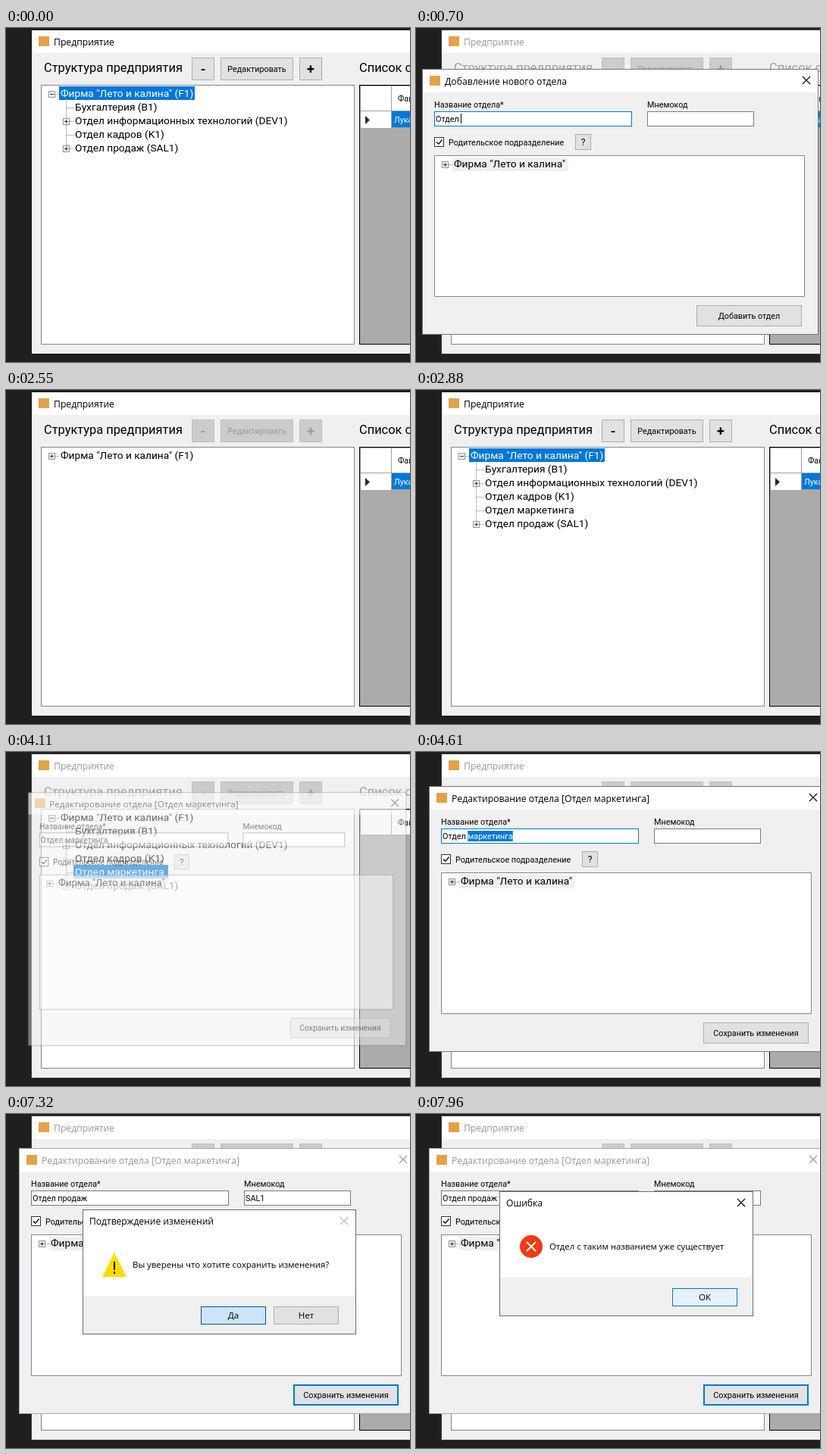
An HTML page with a canvas that plays this animation: 533x441 px, repeating every 8 s.

```html
<!DOCTYPE html>
<html lang="ru">
<head>
<meta charset="utf-8">
<title>Предприятие</title>
<style>
html, body { margin: 0; width: 100%; height: 100%; overflow: hidden; background: #1f1f1f; }
canvas { display: block; }
</style>
</head>
<body>
<canvas id="stage" width="533" height="441"></canvas>
<script>
const ctx = document.getElementById('stage').getContext('2d');
const LOOP = 8000;
const BLUE = '#0078d7', FACE = '#f0f0f0', EDGE = '#828790', PALE = '#a0a0a0';
const UI = '"Open Sans", sans-serif', FORM = 'Roboto, sans-serif';
const SMALL = 10.8, TREE = 13.7, HEADING = 16.4;
const FIRM = 'Фирма "Лето и калина"';
const NORMAL = ['#e1e1e1', '#adadad', 1], DEFAULT = ['#e1e1e1', BLUE, 2],
  HOVER = ['#e5f1fb', BLUE, 1], PRESSED = ['#cce4f7', '#005499', 1],
  DISABLED = ['#cccccc', '#bfbfbf', 1];
let t = 0;

const between = (a, b) => t >= a && t < b;
const ramp = (a, b) => Math.min(1, Math.max(0, (t - a) / (b - a)));
// Latest value whose start time has passed: at(first, time, value, time, value, ...)
function at(value, ...steps) {
  for (let i = 0; i < steps.length && t >= steps[i]; i += 2) value = steps[i + 1];
  return value;
}

function rect(x, y, w, h, color) {
  ctx.fillStyle = color;
  ctx.fillRect(x, y, w, h);
}

function box(x, y, w, h, fill, edge, line = 1) {
  rect(x + line, y + line, w - 2 * line, h - 2 * line, fill);
  ctx.strokeStyle = edge;
  ctx.lineWidth = line;
  ctx.strokeRect(x + line / 2, y + line / 2, w - line, h - line);
}

function text(str, x, y, size, color = '#000', font = FORM, align = 'left', weight = '') {
  ctx.font = `${weight} ${size}px ${font}`;
  ctx.textAlign = align;
  ctx.textBaseline = 'alphabetic';
  ctx.fillStyle = color;
  ctx.fillText(str, x, Math.round(y + size * 0.36));
  return ctx.measureText(str).width;
}

function stroke(color, width, points, dash = []) {
  ctx.strokeStyle = color;
  ctx.lineWidth = width;
  ctx.setLineDash(dash);
  ctx.beginPath();
  for (let i = 0; i < points.length; i += 4) {
    ctx.moveTo(points[i], points[i + 1]);
    ctx.lineTo(points[i + 2], points[i + 3]);
  }
  ctx.stroke();
  ctx.setLineDash([]);
}

const dotted = (...points) => stroke('#808080', 1, points, [1, 1]);
const cross = (x, y, r, color, width) =>
  stroke(color, width, [x - r, y - r, x + r, y + r, x - r, y + r, x + r, y - r]);

function button(label, x, y, w, h, style, size = SMALL, color = '#000', font = FORM, weight = '') {
  box(x, y, w, h, ...style);
  text(label, x + w / 2, y + h / 2, size, color, font, 'center', weight);
}

function expander(x, y, open) {
  box(x - 4, y - 4, 9, 9, '#fff', '#919191');
  rect(x - 2, y, 5, 1, '#333');
  if (!open) rect(x, y - 2, 1, 5, '#333');
}

function titleBar(title, x, y, w, active) {
  rect(x, y, w, 30, '#fff');
  rect(x + 9, y + 8, 14, 13, '#e3a24a');
  text(title, x + 29, y + 15.5, 12.2, active ? '#000' : '#999', UI);
}

function mainTree() {
  box(46, 75, 414, 343, '#fff', EDGE);
  const open = !between(2170, 2880), chosen = at('root', 2170, '', 2880, 'root', 3260, 'new');
  const rows = ['Бухгалтерия (B1)', 'Отдел информационных технологий (DEV1)',
    'Отдел кадров (K1)', 'Отдел продаж (SAL1)'];
  if (t >= 2170) rows.splice(3, 0, 'Отдел маркетинга');

  dotted(65, 87.5, 70, 87.5);
  expander(60, 87, open);
  if (chosen === 'root') rect(70, 77, 179, 18, BLUE);
  text(FIRM + ' (F1)', 72, 86.5, TREE, chosen === 'root' ? '#fff' : '#000');
  if (!open) return;

  dotted(79.5, 96, 79.5, 87 + rows.length * 18);
  rows.forEach((row, i) => {
    const y = 105 + i * 18, selected = chosen === 'new' && i === 3;
    dotted(80, y + .5, 89, y + .5);
    if (/DEV1|SAL1/.test(row)) expander(79, y, false);
    if (selected) rect(89, y - 10, 125, 18, BLUE);
    text(row, 91, y - .5, TREE, selected ? '#fff' : '#000');
  });
}

function grid() {
  box(466, 75, 100, 343, '#ababab', '#000');
  box(467, 76, 42, 34, '#fff', PALE);
  box(508, 76, 90, 34, '#fff', PALE);
  text('Фамилия', 517, 93, SMALL);
  if (t >= 3410) return;
  rect(467, 110, 1, 22, PALE);
  rect(468, 110, 40, 22, '#fff');
  rect(508, 110, 1, 22, PALE);
  rect(509, 110, 24, 21, BLUE);
  rect(509, 131, 24, 1, PALE);
  text('Лукарин', 512, 121, SMALL, '#fff');
  ctx.fillStyle = '#25254f';
  ctx.beginPath();
  ctx.moveTo(474, 116);
  ctx.lineTo(480, 121.5);
  ctx.lineTo(474, 127);
  ctx.fill();
}

function mainWindow() {
  const active = !between(150, 2490) && t < 4110;
  const ready = active && !between(2170, 2880);
  const ink = active ? '#000' : PALE, label = ready ? '#000' : '#999';
  box(33, 2, 520, 429, FACE, active ? '#181818' : '#3c3c3c');
  titleBar('Предприятие', 34, 3, 499, active);
  text('Структура предприятия', 50, 52.5, HEADING, ink);
  text('Список сотрудников', 466, 52.5, HEADING, ink);
  const style = ready ? NORMAL : DISABLED;
  button('-', 245, 39, 30, 30, style, 17, label, FORM, 'bold');
  button('Редактировать', 283, 39, 96, 30, ready && t >= 3880 ? HOVER : style, SMALL, label);
  button('+', 387, 39, 30, 30, style, 18, label, FORM, 'bold');
  mainTree();
  grid();
}

// Text box with optional selected tail and caret
function field(x, y, w, value, edge, selected = '', caret = false) {
  box(x, y, w, 20, '#fff', edge);
  let end = x + 2 + text(value, x + 2, y + 10, SMALL);
  if (selected) {
    rect(end, y + 3, ctx.measureText(selected).width, 14, BLUE);
    text(selected, end, y + 10, SMALL, '#fff');
  }
  if (caret) rect(Math.round(end), y + 3, 1, 13, '#000');
}

function dialog(x, y, d) {
  ctx.save();
  ctx.globalAlpha = d.alpha;
  const s = .92 + .08 * d.alpha;
  ctx.translate(x + 261, y + 175);
  ctx.scale(s, s);
  ctx.translate(-x - 261, -y - 175);
  box(x - 1, y - 1, 523, 351, FACE, d.active ? '#777' : '#aaa');
  titleBar(d.title, x, y, 521, d.active);
  cross(x + 506, y + 14, 5, d.active ? '#000' : '#999', 1.1);
  text('Название отдела*', x + 15, y + 46, SMALL);
  text('Мнемокод', x + 296, y + 46, SMALL);
  field(x + 15, y + 55, 261, d.name, d.nameEdge, d.selected, d.nameCaret);
  field(x + 296, y + 55, 141, d.code, d.codeEdge, '', d.codeCaret);
  box(x + 15, y + 89, 13, 13, '#fff', '#333');
  stroke('#000', 1.3, [x + 18, y + 95.5, x + 20.7, y + 98.3, x + 20.7, y + 98.3, x + 25.5, y + 92.5]);
  text('Родительское подразделение', x + 34, y + 96, SMALL);
  button('?', x + 201, y + 85, 21, 21, NORMAL, 12);
  box(x + 15, y + 113, 489, 187, '#fff', EDGE);
  dotted(x + 34, y + 125.5, x + 39, y + 125.5);
  expander(x + 29, y + 125, false);
  rect(x + 39, y + 116, 153, 18, d.rootOn ? BLUE : FACE);
  text(FIRM, x + 41, y + 124.5, TREE, d.rootOn ? '#fff' : '#000');
  button(d.action, x + 361, y + 311, 139, 28, d.style);
  ctx.restore();
}

function icon(kind, x, y) {
  ctx.beginPath();
  if (kind === 'warn') {
    ctx.moveTo(x, y - 16);
    ctx.lineTo(x + 16, y + 16);
    ctx.lineTo(x - 16, y + 16);
    ctx.fillStyle = '#ffdc00';
    ctx.fill();
    rect(x - 1, y - 4, 2, 11, '#000');
    rect(x - 1, y + 9, 2, 3, '#000');
    return;
  }
  ctx.arc(x, y, 15, 0, Math.PI * 2);
  ctx.fillStyle = kind === 'info' ? BLUE : '#f03a17';
  ctx.fill();
  if (kind === 'error') return cross(x, y, 6, '#fff', 2);
  rect(x - 1, y - 4, 2, 12, '#fff');
  rect(x - 1, y - 9, 2, 3, '#fff');
}

// buttons: [label, x, style], ...
function message(x, y, w, kind, title, body, alpha, buttons) {
  ctx.save();
  ctx.globalAlpha = alpha;
  box(x, y, w, 165, '#fff', '#6b6b6b');
  rect(x + 1, y + 114, w - 2, 50, FACE);
  text(title, x + 9, y + 16, 12.1, '#000', UI);
  cross(x + w - 16, y + 15, 5, kind === 'warn' ? '#bbb' : '#000', 1.1);
  icon(kind, x + 42, y + 73);
  text(body, x + 66, y + 73, 11.4, '#000', UI);
  for (const [label, bx, style] of buttons)
    button(label, bx, y + 128, 86, 24, style, 11.6, '#000', UI);
  ctx.restore();
}

function addDialog() {
  dialog(9, 55, {
    title: 'Добавление нового отдела', action: 'Добавить отдел',
    alpha: ramp(80, 300) * (1 - ramp(2330, 2490)),
    active: t < 1780 || t >= 2250,
    name: at('', 460, 'От', 540, 'Отде', 700, 'Отдел ', 930, 'Отдел марке', 1000, 'Отдел маркетинга'),
    nameEdge: between(390, 1230) ? BLUE : '#7a7a7a',
    nameCaret: between(390, 1230),
    code: '', codeEdge: '#7a7a7a',
    style: at(NORMAL, 1230, HOVER, 1320, DEFAULT)
  });
  if (between(1780, 2250))
    message(142, 151, 245, 'info', 'Успех', 'Отдел успешно добавлен', 1 - ramp(2120, 2250),
      [['OK', 281, at(DEFAULT, 2010, HOVER, 2090, PRESSED)]]);
}

function editDialog() {
  dialog(18, 46, {
    title: 'Редактирование отдела [Отдел маркетинга]', action: 'Сохранить изменения',
    alpha: ramp(4040, 4200),
    active: t < 6710,
    name: at('Отдел маркетинга', 4350, 'Отдел марке', 4440, 'Отдел м', 4610, 'Отдел ',
      5310, 'Отдел про', 5390, 'Отдел продаж'),
    selected: at('', 4350, 'тинга', 4440, 'аркетинга', 4610, 'маркетинга', 5310, ''),
    nameEdge: between(4270, 5690) ? BLUE : '#7a7a7a',
    nameCaret: between(5310, 5540),
    code: at('', 5690, 'S', 5840, 'SA', 5920, 'SAL1'),
    codeEdge: at('#7a7a7a', 5690, BLUE, 6240, '#3c93dc', 6320, '#7a7a7a'),
    codeCaret: between(5690, 5920),
    rootOn: between(6240, 6630),
    style: at(NORMAL, 6480, HOVER, 6630, PRESSED, 6710, DEFAULT)
  });
  if (between(6710, 7500))
    message(101, 126, 361, 'warn', 'Подтверждение изменений',
      'Вы уверены что хотите сохранить изменения?', ramp(6630, 6860) * (1 - ramp(7390, 7500)),
      [['Да', 257, at(DEFAULT, 7320, PRESSED)], ['Нет', 353, NORMAL]]);
  if (t >= 7410) {
    const glow = at(0, 7650, .25, 7800, .5, 7880, .75, 7960, 1);
    const fill = `rgb(${225 + 4 * glow}, ${225 + 16 * glow}, ${225 + 26 * glow})`;
    message(110, 102, 335, 'error', 'Ошибка', 'Отдел с таким названием уже существует',
      ramp(7360, 7500), [['OK', 338, [fill, BLUE, 1]]]);
  }
}

function draw(now) {
  t = now % LOOP;
  rect(0, 0, 533, 441, '#1f1f1f');
  mainWindow();
  if (between(150, 2490)) addDialog();
  if (t >= 4110) editDialog();
  requestAnimationFrame(draw);
}
requestAnimationFrame(draw);
</script>
</body>
</html>
```
